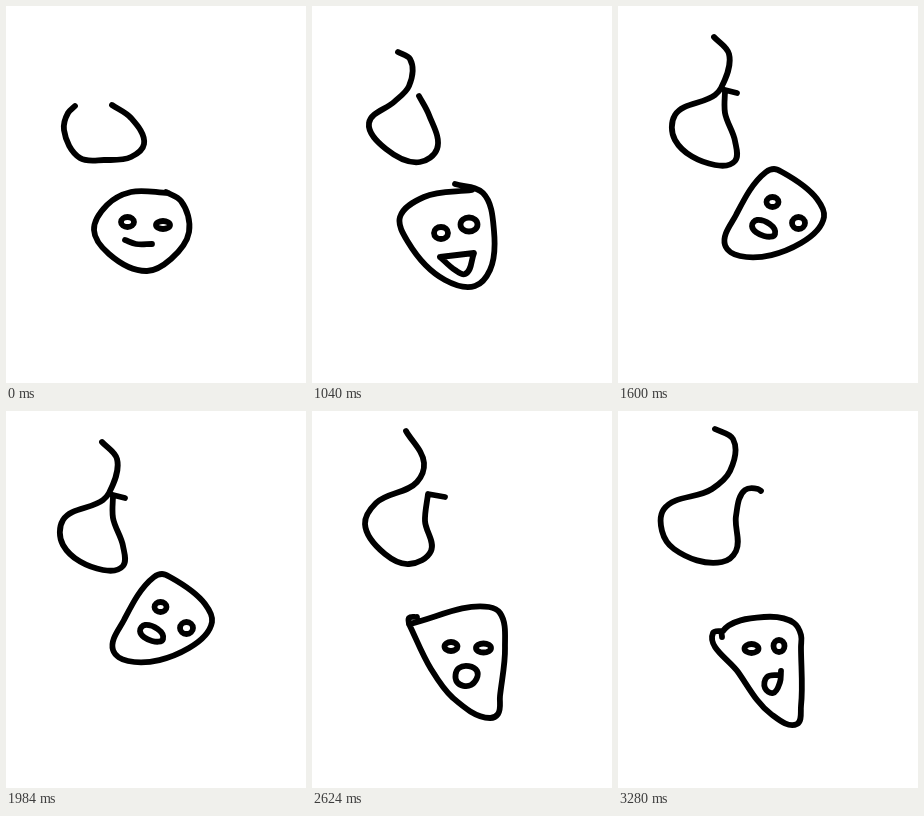
An HTML page for the animation above (3600 ms loop, 300x377 px).

```html
<!DOCTYPE html>
<html lang="en">
<head>
<meta charset="utf-8">
<title>Wobbly doodle</title>
<style>
  html, body { margin: 0; width: 100%; height: 100%; overflow: hidden; background: #fff; }
  svg { display: block; width: 100%; height: 100%; }
  g { display: none; fill: none; stroke: #000; stroke-width: 5.8; stroke-linecap: round; stroke-linejoin: round; }
  g.on { display: inline; }
</style>
</head>
<body>
<!-- One group per pose: hair, face, mouth, eyes. Strokes are curves through key points;
     a doubled point is a corner, a final z closes the stroke. -->
<svg viewBox="0 0 300 377">
  <g data-ms="480">
    <path data-via="69,100 62,107 58,124 74,152 98,154 125,151 138,138 125,112 106,99"/>
    <path data-via="162,187 125,186 101,199 88,224 103,248 141,265 165,253 183,226 175,195 160,186"/>
    <path data-via="119,234 130,238 146,238"/>
    <ellipse cx="121.5" cy="216" rx="6.5" ry="5"/>
    <ellipse cx="157" cy="219" rx="7" ry="4"/>
  </g>
  <g data-ms="560">
    <path data-via="76,57 91,78 82,101 55,115 55,115 59,141 101,161 135,155 135,155 135,132 111,99 107,90"/>
    <path data-via="154,183 128,189 94,206 82,226 103,247 141,264 173,247 183,215 174,191 z"/>
    <path data-via="117,232 121,242 141,248 142,241 126,237 z"/>
    <ellipse cx="119.5" cy="211" rx="7" ry="7"/>
    <ellipse cx="159" cy="218" rx="8" ry="5.5"/>
  </g>
  <g data-ms="560">
    <path data-via="86,46 98,53 97,80 82,96 57,117 74,143 108,156 125,143 117,109 107,90"/>
    <path data-via="160,184 112,191 88,211 96,236 133,274 163,280 178,264 182,225 171,187 143,178"/>
    <path data-via="128,251 128,251 162,247 162,247 153,268 143,264 128,251"/>
    <ellipse cx="129" cy="227" rx="7" ry="6"/>
    <ellipse cx="157" cy="218.5" rx="8.5" ry="7"/>
  </g>
  <g data-ms="640">
    <path data-via="96,31 111,48 103,82 97,89 57,109 57,134 97,159 117,155 117,135 107,107 107,84 107,84 119,87"/>
    <path data-via="156,163 148,166 118,209 107,239 122,250 183,237 206,211 199,193 164,166 z"/>
    <path data-via="139,214 134,220 146,230 157,228 z"/>
    <ellipse cx="154.5" cy="196" rx="6" ry="5"/>
    <ellipse cx="180.5" cy="217" rx="6.5" ry="6"/>
  </g>
  <g data-ms="640">
    <path data-via="94,20 112,52 105,71 64,92 53,113 73,143 97,153 119,140 113,110 116,83 116,83 133,86"/>
    <path data-via="105,206 97,207 97,213 97,213 177,196 188,202 193,237 188,285 186,303 178,307 141,287 119,258 97,213"/>
    <path data-via="147,257 165,260 159,274 145,271 z"/>
    <ellipse cx="139" cy="235.5" rx="6.5" ry="4.5"/>
    <ellipse cx="171.5" cy="237" rx="7.5" ry="4.5"/>
  </g>
  <g data-ms="400">
    <path data-via="91,20 108,27 106,56 80,81 55,99 49,120 70,144 98,150 114,135 113,97 127,79 134,82"/>
    <path data-via="160,155 155,161 133,186 111,232 115,244 115,244 160,243 204,226 210,210 199,185 161,156"/>
    <path data-via="137,206 131,216 137,229 152,229 153,221 143,217 z"/>
    <ellipse cx="158.5" cy="197" rx="7" ry="7"/>
    <ellipse cx="180" cy="214" rx="7" ry="6"/>
  </g>
  <g data-ms="320">
    <path data-via="97,18 115,28 112,60 94,78 46,98 44,120 56,138 104,151 118,140 118,105 127,79 140,78 143,80"/>
    <path data-via="104,226 104,221 146,206 176,212 183,224 183,236 183,295 179,313 153,303 120,261 95,222 105,220"/>
    <path data-via="163,260 162,271 155,282 147,277 149,266 162,264"/>
    <ellipse cx="133.5" cy="237.5" rx="7" ry="4.5"/>
    <ellipse cx="161" cy="235" rx="5.5" ry="6"/>
  </g>
</svg>
<script>
  const sub = (p, q) => [p[0] - q[0], p[1] - q[1]];
  const add = (p, q, k = 1) => [p[0] + q[0] * k, p[1] + q[1] * k];
  const unit = v => add([0, 0], v, 1 / (Math.hypot(...v) || 1));

  // Cubic curve whose tangent at each point bisects the two neighbouring chords.
  function curve(text) {
    const closed = text.endsWith('z');
    const pts = text.replace(' z', '').split(' ').map(p => p.split(',').map(Number));
    const n = pts.length;
    const at = i => pts[closed ? (i + n) % n : Math.max(0, Math.min(n - 1, i))];
    const tangent = i => unit(add(unit(sub(at(i), at(i - 1))), unit(sub(at(i + 1), at(i)))));
    let d = 'M' + pts[0];
    for (let i = 0; i < (closed ? n : n - 1); i++) {
      const from = at(i), to = at(i + 1);
      const reach = Math.hypot(...sub(to, from)) / 3;
      d += `C${add(from, tangent(i), reach)} ${add(to, tangent(i + 1), -reach)} ${to}`;
    }
    return closed ? d + 'Z' : d;
  }

  for (const path of document.querySelectorAll('path')) {
    path.setAttribute('d', curve(path.dataset.via));
  }

  const poses = [...document.querySelectorAll('g')];
  const holds = poses.map(pose => +pose.dataset.ms);
  const loop = holds.reduce((sum, ms) => sum + ms);
  const start = performance.now();

  function show() {
    let t = (performance.now() - start) % loop;
    let current = 0;
    while (t >= holds[current]) t -= holds[current++];
    poses.forEach((pose, i) => pose.classList.toggle('on', i === current));
    requestAnimationFrame(show);
  }
  show();
</script>
</body>
</html>
```
